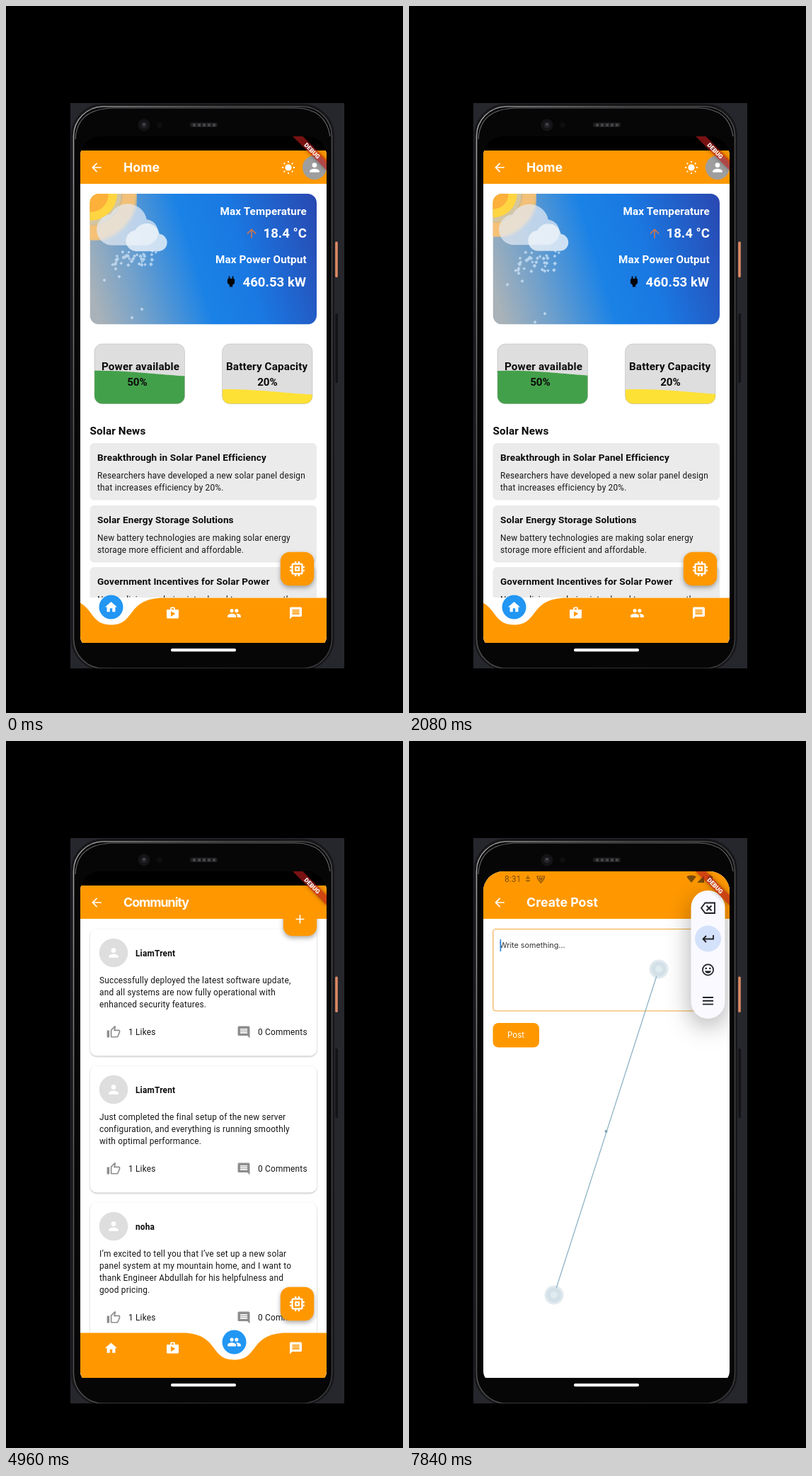
Write an HTML page that moves like this. It is 561x998 px and loops after 8 s.

```html
<!DOCTYPE html>
<html lang="en">
<head>
<meta charset="utf-8">
<title>Solar app</title>
<style>
html, body { margin: 0; width: 100%; height: 100%; overflow: hidden; background: #000; }
svg { display: block; width: 100vw; height: 100vh; font-family: Roboto, sans-serif; }
.title, .form { font-family: Inter, "Open Sans", sans-serif; }
.card { filter: drop-shadow(0 1px 1px rgba(0,0,0,.28)); }
.fab { filter: drop-shadow(0 3px 3px rgba(0,0,0,.32)); }
.pill { filter: drop-shadow(0 10px 17px rgba(0,0,0,.32)); }
</style>
</head>
<body>
<svg id="stage" viewBox="0 0 561 998"></svg>
<script>
const ORANGE = '#ff9800', LP = 0.847, LOOP = 8000;
const $ = id => document.getElementById(id);
const clamp = v => Math.max(0, Math.min(1, v));
const span = (t, a, b) => clamp((t - a) / (b - a));
const easeOut = p => 1 - (1 - p) ** 3;

const paths = {
  back: 'M20 11H7.83l5.59-5.59L12 4l-8 8 8 8 1.41-1.41L7.83 13H20z',
  up: 'M4 12l1.41 1.41L11 7.83V20h2V7.83l5.58 5.59L20 12l-8-8z',
  person: 'M12 12a4 4 0 1 0 0-8 4 4 0 0 0 0 8zm0 2c-2.67 0-8 1.34-8 4v2h16v-2c0-2.66-5.33-4-8-4z',
  home: 'M10 20v-6h4v6h5v-8h3L12 3 2 12h3v8z',
  shop: 'M16 6V4a2 2 0 0 0-2-2h-4a2 2 0 0 0-2 2v2H2v13a2 2 0 0 0 2 2h16a2 2 0 0 0 2-2V6zm-6-2h4v2h-4zM9 18V9l7.5 4z',
  people: 'M16 11a3 3 0 1 0 0-6 3 3 0 0 0 0 6zm-8 0a3 3 0 1 0 0-6 3 3 0 0 0 0 6zm0 2c-2.33 0-7 1.17-7 3.5V19h14v-2.5C15 14.17 10.33 13 8 13zm8 0l-.97.05C16.2 13.9 17 15 17 16.5V19h6v-2.5c0-2.33-4.67-3.5-7-3.5z',
  chat: 'M20 2H4a2 2 0 0 0-2 2v18l4-4h14a2 2 0 0 0 2-2V4a2 2 0 0 0-2-2zm-2 12H6v-2h12zm0-3H6V9h12zm0-3H6V6h12z',
  chip: 'M15 9H9v6h6zm-2 4h-2v-2h2zm8-2V9h-2V7a2 2 0 0 0-2-2h-2V3h-2v2h-2V3H9v2H7a2 2 0 0 0-2 2v2H3v2h2v2H3v2h2v2a2 2 0 0 0 2 2h2v2h2v-2h2v2h2v-2h2a2 2 0 0 0 2-2v-2h2v-2h-2v-2zm-4 6H7V7h10z',
  like: 'M9 21h9a2 2 0 0 0 1.84-1.22l3.02-7.05L23 12v-2a2 2 0 0 0-2-2h-6.31l.95-4.57-.41-1.38L14.17 1 7.58 7.59A2 2 0 0 0 7 9v10a2 2 0 0 0 2 2zM9 9l4.34-4.34L12 10h9v2l-3 7H9zM1 9h4v12H1z',
  plug: 'M16 7V3h-2v4h-4V3H8v4a2 2 0 0 0-2 2v5.5L9.5 18v3h5v-3l3.5-3.5V9a2 2 0 0 0-2-2z',
  cloud: 'M19.35 10.04A7.5 7.5 0 0 0 5.35 8.04 6 6 0 0 0 6 20h13a5 5 0 0 0 .35-9.96z',
  plus: 'M19 13h-6v6h-2v-6H5v-2h6V5h2v6h6z'
};

const icon = (name, x, y, fill = '#fff', sx = LP, sy = LP) =>
  `<path d="${paths[name]}" fill="${fill}" fill-rule="evenodd" transform="translate(${x} ${y}) scale(${sx} ${sy}) translate(-12 -12)"/>`;
const line = (d, stroke, w = 2, more = '') =>
  `<path d="${d}" fill="none" stroke="${stroke}" stroke-width="${w}" ${more}/>`;
const rect = (x, y, w, h, r, fill, more = '') =>
  `<rect x="${x}" y="${y}" width="${w}" height="${h}" rx="${r}" fill="${fill}" ${more}/>`;
const circle = (x, y, r, fill, more = '') =>
  `<circle cx="${x}" cy="${y}" r="${r}" fill="${fill}" ${more}/>`;
const text = (x, y, s, size, weight = 400, fill = '#111', gap = 0, more = '') =>
  `<text x="${x}" y="${y}" font-size="${size}" font-weight="${weight}" fill="${fill}" letter-spacing="${gap}" ${more}>${s}</text>`;
const body = (x, y, s) => text(x, y, s, 11.85, 400, '#161616', .21);
const heading = (x, y, s, fill = '#0b0b0b') => text(x, y, s, 15.24, 700, fill, .13);
const appBar = (s, top = 204, gap = 0) =>
  rect(104, top, 350, 251 - top, 0, ORANGE) + icon('back', 128, 228) +
  text(166, 234, s, 17.8, 700, '#fff', gap, 'class="title"');
const fab = (x, y, name) =>
  rect(x - 23.7, y - 23.7, 47.4, 47.4, 13, ORANGE, 'class="fab"') + icon(name, x, y, '#fff', 1.16, 1.16);

function gauge(x, mid, id, colour, labelX, label, value) {
  return `<clipPath id="${id}Clip">${rect(x, 477, 127.5, 84.5, 11, '#000')}</clipPath>
    ${rect(x, 477, 127.5, 84.5, 11, '#dedede')}
    <path id="${id}" fill="${colour}" clip-path="url(#${id}Clip)"/>
    ${rect(x, 477, 127.5, 84.5, 11, 'none', 'stroke="#999" stroke-width=".35"')}
    ${heading(labelX, 514, label)}
    ${text(mid, 536, value, 15.24, 700, '#0b0b0b', 0, 'text-anchor="middle"')}`;
}

function news(y, head, lines) {
  return rect(118.5, y, 320.5, 80.5, 6, '#ebebeb') + text(129, y + 25, head, 13.55, 700, '#0b0b0b', .13) +
    lines.map((s, i) => body(129, y + 50 + i * 16.8, s)).join('');
}

function post(y, name, lines) {
  const foot = y + 99 + lines.length * 17;
  return rect(119, y, 320, foot - y + 29, 9, '#fff', 'class="card"') +
    circle(152, y + 33.5, 20.3, '#dedede') + icon('person', 152, y + 33.5) +
    text(183, y + 38, name, 11.85, 700, '#0b0b0b', .21) +
    lines.map((s, i) => body(132, y + 76.5 + i * 17, s)).join('') +
    icon('like', 152, foot - 4.5, '#8d8d8d') + body(173, foot - .5, '1 Likes') +
    icon('chat', 336, foot - 4.5, '#8d8d8d', -LP) + body(356, foot - .5, '0 Comments');
}

// seeded flakes: a loose cluster below the clouds and a few that fell further
let seed = 7;
const rnd = () => (seed = seed * 16807 % 2147483647) / 2147483647;
const flakes = Array.from({ length: 34 }, () => {
  const u = rnd();
  return { x: 147 + rnd() * 65, y: 346 + u * 21, r: 1.9 + rnd() * 1.1, speed: u * .0045 };
}).concat([[139, 387], [160, 382], [155, 371], [192, 428], [178, 440]]
  .map(([x, y]) => ({ x, y, r: 2.5, speed: .003 })));

const sunRays = 'M12 1v2.6M12 20.4V23M1 12h2.6M20.4 12H23M4.2 4.2l1.9 1.9M17.9 17.9l1.9 1.9M4.2 19.8l1.9-1.9M17.9 6.1l1.9-1.9';

const homePage = `<g id="home">${rect(104, 204, 350, 696, 0, '#fff')}${appBar('Home')}
  <g transform="translate(399 228) scale(.82) translate(-12 -12)">${circle(12, 12, 5.6, '#fff') + line(sunRays, '#fff', 2.2)}</g>
  ${circle(436, 228, 17, '#9e9e9e') + icon('person', 436, 228)}
  <g clip-path="url(#cardClip)">
    ${rect(118.5, 265, 320.5, 184.5, 0, 'url(#sky)')}
    <g transform="translate(119 265)">
      <circle id="sunOut" fill="none" stroke="#ffc470" stroke-width="24" filter="url(#soft)" opacity=".92"/>
      <circle id="sunMid" fill="#d3c6a2"/><circle id="sunRing" fill="#ffd541"/><circle id="sunCore" fill="#fdb03a"/>
    </g>
    <path id="cloudBack" d="${paths.cloud}" fill="#e3ebf4" opacity=".72"/>
    <path id="cloudFront" d="${paths.cloud}" fill="#f0f5fa" opacity=".8"/>
    <path id="snow" fill="#d5e9fb" opacity=".7"/>
  </g>
  ${heading(302.5, 295, 'Max Temperature', '#fff')}
  ${icon('up', 347, 321, '#c97450')}${text(363.5, 327, '18.4 °C', 18.63, 700, '#fff')}
  ${heading(296, 363, 'Max Power Output', '#fff')}
  ${icon('plug', 318, 389, '#050505')}${text(334.5, 395.5, '460.53 kW', 18.63, 700, '#fff')}
  ${gauge(125, 185.5, 'green', '#43a04a', 135, 'Power available', '50%')}
  ${gauge(305.5, 369.5, 'yellow', '#fee135', 311, 'Battery Capacity', '20%')}
  ${heading(118.5, 605, 'Solar News')}
  ${news(617, 'Breakthrough in Solar Panel Efficiency', ['Researchers have developed a new solar panel design', 'that increases efficiency by 20%.'])}
  ${news(705, 'Solar Energy Storage Solutions', ['New battery technologies are making solar energy', 'storage more efficient and affordable.'])}
  ${news(792, 'Government Incentives for Solar Power', ['New policies are being introduced to encourage the'])}
</g>`;

const communityPage = `<g id="community">${rect(104, 204, 350, 696, 0, '#fff')}
  ${post(265.5, 'LiamTrent', ['Successfully deployed the latest software update,', 'and all systems are now fully operational with', 'enhanced security features.'])}
  ${post(458.5, 'LiamTrent', ['Just completed the final setup of the new server', 'configuration, and everything is running smoothly', 'with optimal performance.'])}
  ${post(651.5, 'noha', ['I’m excited to tell you that I’ve set up a new solar', 'panel system at my mountain home, and I want to', 'thank Engineer Abdullah for his helpfulness and', 'good pricing.'])}
  ${appBar('Community', 204, -1)}
  <clipPath id="fabClip">${rect(391.8, 227.8, 47.4, 47.4, 13, '#000')}</clipPath>
  <g clip-path="url(#below)">${rect(391.8, 227.8, 47.4, 47.4, 13, ORANGE, 'class="fab"')}</g>
  <g id="press">${rect(391.8, 227.8, 47.4, 47.4, 13, ORANGE, 'class="fab"')}
    <circle id="ripple" cx="415.5" cy="251.5" fill="#f5a53c" clip-path="url(#fabClip)"/></g>
  ${icon('plus', 415.5, 251.5)}
</g>`;

const navIcons = ['home', 'shop', 'people', 'chat'];
const navX = i => 105 + 348 * (i + .5) / 4;
const nav = `${rect(104, 835, 350, 65, 0, '#fff')}
  <g id="knob">${circle(0, 0, 17, '#2196f3')}<g id="knobHome">${icon('home', 0, 0)}</g><g id="knobPeople">${icon('people', 0, 0)}</g></g>
  <path id="bar" fill="${ORANGE}"/>
  ${navIcons.map((n, i) => `<g id="nav${i}">${icon(n, navX(i), 857)}</g>`).join('')}`;

const dim = '#7d4d0c', ink = '#1f2024';
const createPage = `<g id="create">${rect(104, 183, 350, 717, 0, '#fff')}${appBar('Create Post', 183)}
  ${text(135, 199, '8:31', 12, 400, dim)}
  ${line('M165 193.5h6M168 190v5M165.5 196a2.6 2.6 0 0 0 5 0', dim, 1.2)}
  ${line('M181 191h10.5l-1 4-4.2 5-4.2-5zM184 193.5h4.5l-2.2 3z', dim, 1.2)}
  <path d="M392 191.5q7-4 14 0l-7 8.5zM407 200l10-10v10zM422 191h2v-1.5h3v1.5h2v9h-7z" fill="${dim}"/>
  <rect id="field" x="118.8" y="265.5" width="320.2" height="115.5" rx="4" fill="none"/>
  ${text(128, 292, 'Write something...', 10.8, 400, '#333', 0, 'class="form"')}
  <g id="caret">${rect(128.5, 280, 1.7, 17, 0, '#2f86dc')}</g>
  ${rect(118.5, 398, 65.5, 34.5, 8, ORANGE)}
  ${text(151, 419, 'Post', 11.6, 400, '#fff', 0, 'class="form" text-anchor="middle"')}
  <g id="tools">${rect(398.5, 211, 48, 181, 24, '#f9f9ff', 'class="pill"')}${circle(422.5, 279, 18.5, '#d4e1fb')}
    ${line('M418.5 228.500h13.5v14.5h-13.5l-5.5-7.2zM420.5 232.5l7 7m0-7l-7 7', ink, 1.8)}
    ${line('M430 274v5.5h-14.5m4.5-4.5l-4.5 4.5 4.5 4.5', ink, 1.8)}
    ${circle(422.5, 323, 7.6, 'none', `stroke="${ink}" stroke-width="1.7"`) + circle(419.7, 321, 1.3, ink) + circle(425.3, 321, 1.3, ink)}
    <path d="M418 324.5h9a4.7 4.7 0 0 1-9 0z" fill="${ink}"/>
    ${line('M415 362h15M415 366.8h15M415 371.6h15', ink, 1.9)}</g>
</g>`;

const touch = (x, y) => circle(x, y, 13.5, '#c9d8e1', 'opacity=".55"') +
  circle(x, y, 10.5, '#c9d8e1', 'opacity=".6"') + circle(x, y, 5, '#e4edf2', 'opacity=".8"');

const screenShape = 'M105 212a28 28 0 0 1 28-28h292a28 28 0 0 1 28 28V889q0 6-3 10H108q-3-4-3-10z';

$('stage').innerHTML = `<defs>
  <linearGradient id="sky" gradientUnits="userSpaceOnUse" x1="119" y1="400" x2="445" y2="300">
    <stop offset="0" stop-color="#a9b2b8"/><stop offset=".2" stop-color="#6d9fcc"/><stop offset=".45" stop-color="#1a82e6"/>
    <stop offset=".65" stop-color="#1a78e2"/><stop offset="1" stop-color="#2949b2"/></linearGradient>
  <linearGradient id="edge" x1="0" y1="0" x2="1" y2="1">
    <stop offset="0" stop-color="#a5a5a5"/><stop offset=".3" stop-color="#555"/><stop offset="1" stop-color="#38383a"/></linearGradient>
  <filter id="soft"><feGaussianBlur stdDeviation="2"/></filter>
  <clipPath id="screen"><path d="${screenShape}"/></clipPath>
  <clipPath id="cardClip">${rect(118.5, 265, 320.5, 184.5, 13, '#000')}</clipPath>
  <clipPath id="below">${rect(380, 251, 73, 40, 0, '#000')}</clipPath>
  <clipPath id="shot">${rect(91, 137, 387, 798, 0, '#000')}</clipPath>
</defs>
${rect(0, 0, 561, 998, 0, '#000')}
<g clip-path="url(#shot)">
  ${rect(91, 137, 387, 798, 0, '#26272d')}
  ${rect(465.2, 332.5, 3.6, 50.5, 1.5, '#de8a64') + rect(465.5, 434, 3.5, 98, 1, '#141417')}
  ${rect(93.5, 139.5, 369, 797, 44, '#0a0a0b', 'stroke="#17171a" stroke-width="3"')}
  ${rect(95.5, 142, 365, 793, 42, '#060607', 'stroke="url(#edge)" stroke-width="1.6"')}
  ${line('M98 188q2-43 54-44h258q42 1 48 40', '#66666a', 1.2)}
  ${circle(195, 168, 8.5, '#141416') + circle(195, 168, 4, '#252629') + circle(195, 167, 1.4, '#56585e') + circle(217, 168, 4, '#0e0e10')}
  ${rect(260, 164.5, 39, 6.5, 3, '#1d1d1f') + line('M264 168h33', '#444447', 4, 'stroke-dasharray="4 3"')}
</g>
<path d="${screenShape}" fill="#000"/>
<g clip-path="url(#screen)">
  <g id="shell">${homePage}${communityPage}${fab(411.5, 794.5, 'chip')}${nav}</g>
  <rect id="scrim" x="104" y="183" width="350" height="717"/>
  ${createPage}
</g>
<clipPath id="corner">${rect(380, 184, 73, 70, 0, '#000')}</clipPath>
<g clip-path="url(#corner)"><g transform="translate(453 184) rotate(45)">
  ${rect(-33.9, 23.7, 67.8, 10.2, 0, '#b71c1c', 'opacity=".66" filter="drop-shadow(0 0 3px rgba(0,0,0,.5))"')}
  ${text(0, 31.9, 'DEBUG', 8.6, 900, '#fff', 0, 'text-anchor="middle"')}</g></g>
${rect(233, 907, 92, 4.2, 2, '#fff')}
<g id="pinch">${touch(353, 322) + touch(205, 782) + line('M349.8 332L208.2 772', '#8db4c6', 1.3) + circle(278.5, 551, 2, '#7fa5b6')}</g>`;

const show = (id, on) => $(id).style.display = on ? '' : 'none';
const set = (id, attrs) => { for (const k in attrs) $(id).setAttribute(k, attrs[k]); };
const zoom = s => `translate(279 541.5) scale(${s}) translate(-279 -541.5)`;

// one degree of sine per logical pixel, one turn in two seconds
function wave(id, x0, level, t) {
  const phase = 278 + t * .18;
  let d = `M${x0} 562`;
  for (let x = 0; x <= 128; x += 4)
    d += `L${x0 + x} ${level + 4.2 * Math.sin((phase - x / LP) * Math.PI / 180)}`;
  set(id, { d: d + 'V562z' });
}

function weather(t) {
  const k = Math.cos((t - 800) / 860), r = 67 - 5 * Math.sin(t / 1986);
  set('sunOut', { r: r - 12 });
  set('sunMid', { r: r - 23 });
  set('sunRing', { r: r - 29 });
  set('sunCore', { r: r - 41 });
  const cloud = (id, x, y, s) => set(id, { transform: `translate(${x} ${y - 8 * s}) scale(${s}) translate(0 -4)` });
  cloud('cloudBack', 126.7 + 2.2 * k, 308.5, 3.6 + .1 * k);
  cloud('cloudFront', 168 + 2.2 * k, 326.5, 2.39 + .109 * k);
  set('snow', { d: flakes.map(({ x, y, r, speed }) =>
    `M${x - r} ${y + t * speed}l${r} ${-r} ${r} ${r} ${-r} ${r}z`).join('') });
  wave('green', 125, 519, t);
  wave('yellow', 305.5, 545.2, t);
}

function navigation(p) {
  const pos = p / 2, x = 105 + 348 * (pos + .125), hide = 1 - Math.abs(2 * p - 1);
  set('bar', { d: `M0 835.5H${x - 69.6}C${x - 20.9} 838.7 ${x - 34.8} 873.5 ${x} 873.5S${x + 20.9} 838.7 ${x + 69.6} 835.5H560V900H0z` });
  set('knob', { transform: `translate(${x} ${848.5 + hide * 67.8})` });
  show('knobHome', p < .5);
  show('knobPeople', p >= .5);
  navIcons.forEach((n, i) => {
    const far = Math.min(1, 4 * Math.abs(pos - i / 4));
    set('nav' + i, { transform: `translate(0 ${(1 - far) * 34})`, opacity: far });
  });
}

function draw(t) {
  const onHome = t < 3160;
  show('home', onHome);
  show('community', !onHome);
  if (onHome) weather(t);
  navigation(easeOut(span(t, 3160, 3590)));

  show('press', t >= 5860);
  set('ripple', { r: 34 * easeOut(span(t, 5860, 5990)) });

  const open = span(t, 6180, 6500), e = easeOut(open);
  show('shell', open < 1);
  set('shell', { transform: zoom(1 + .05 * e) });
  set('scrim', { opacity: open < 1 ? .6 * e : 0 });
  show('create', open > 0);
  set('create', { transform: zoom(.85 + .15 * e), opacity: span(open, .1, .35) });

  const focus = t >= 7080;
  set('field', { stroke: focus ? '#eda63c' : '#2b2b2b', 'stroke-width': 1.1 });
  show('caret', focus);
  set('tools', { opacity: span(t, 7200, 7360) });
  show('pinch', t >= 7600);
}

let start;
function tick(now) {
  start ??= now;
  draw((now - start) % LOOP);
  requestAnimationFrame(tick);
}
draw(0);
requestAnimationFrame(tick);
</script>
</body>
</html>
```
